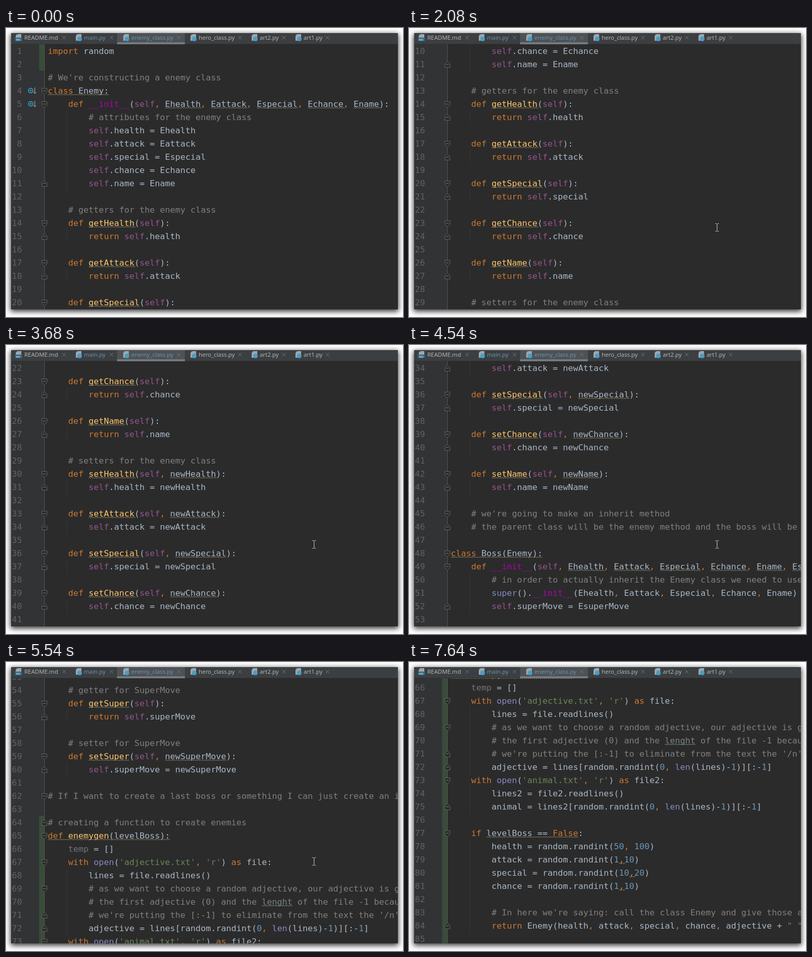
Recreate the animation shown at these times as an HTML page. Size 779 px wide and 568 px high, loop 8 s.

```html
<!DOCTYPE html>
<html lang="en">
<head>
<meta charset="utf-8">
<title>Scrolling code editor</title>
<style>
  html, body { margin: 0; width: 100%; height: 100%; overflow: hidden; background: #fff; }
  #window { position: absolute; left: 10px; top: 10px; width: 759px; height: 543px;
    background: #2b2b2b; box-shadow: 0 3px 10px 1px rgba(0, 0, 0, .8); }
  svg { position: absolute; left: 0; top: 0; }
  .code text { font: 16.61px "DejaVu Sans Mono", monospace; white-space: pre; }
  .tabs text { font: 11.4px "Open Sans", "Noto Sans", sans-serif; }
  .tabs .badge { font: bold 6px "Liberation Sans", sans-serif; }
</style>
</head>
<body>
<div id="window"></div>
<svg width="779" height="568" viewBox="0 0 779 568">
  <clipPath id="pane"><rect x="10" y="32" width="759" height="521"/></clipPath>
  <g clip-path="url(#pane)">
    <rect x="10" y="32" width="66" height="521" fill="#313335"/>
    <rect x="75" y="32" width="1" height="521" fill="#555"/>
    <g id="page" class="code"></g>
    <path id="cursor" fill="none" stroke="#d0d0d0" d="M-3.5-7.5h2.5l1 1 1-1h2.5M0-6.5v13M-3.5 7.5h2.5l1-1 1 1h2.5"/>
  </g>
  <g id="tabs" class="tabs"></g>
</svg>
<script>
const LOOP = 8000, ROW = 26, COL = 10, LEFT = 82;

const getter = (name, field) => `    def get${name}(self):\n        return self.${field}\n`;
const setter = (name, field) =>
  `    def set${name}(self, new${name}):\n        self.${field} = new${name}\n`;
const fields = ['Health', 'Attack', 'Special', 'Chance', 'Name'];
const each = make => fields.map(f => make(f, f.toLowerCase())).join('\n');

const source = `import random

# We're constructing a enemy class
class Enemy:
    def __init__(self, Ehealth, Eattack, Especial, Echance, Ename):
        # attributes for the enemy class
${fields.map(f => `        self.${f.toLowerCase()} = E${f.toLowerCase()}`).join('\n')}

    # getters for the enemy class
${each(getter)}
    # setters for the enemy class
${each(setter)}
    # we're going to make an inherit method
    # the parent class will be the enemy method and the boss will be the child

class Boss(Enemy):
    def __init__(self, Ehealth, Eattack, Especial, Echance, Ename, EsuperMove):
        # in order to actually inherit the Enemy class we need to use super
        super().__init__(Ehealth, Eattack, Especial, Echance, Ename)
        self.superMove = EsuperMove

    # getter for SuperMove
${getter('Super', 'superMove')}
    # setter for SuperMove
    def setSuper(self, newSuperMove):
        self.superMove = newSuperMove

# If I want to create a last boss or something I can just create an instance

# creating a function to create enemies
def enemygen(levelBoss):
    temp = []
    with open('adjective.txt', 'r') as file:
        lines = file.readlines()
        # as we want to choose a random adjective, our adjective is going
        # the first adjective (0) and the lenght of the file -1 because
        # we're putting the [:-1] to eliminate from the text the '/n'
        adjective = lines[random.randint(0, len(lines)-1)][:-1]
    with open('animal.txt', 'r') as file2:
        lines2 = file2.readlines()
        animal = lines2[random.randint(0, len(lines)-1)][:-1]

    if levelBoss == False:
        health = random.randint(50, 100)
        attack = random.randint(1,10)
        special = random.randint(10,20)
        chance = random.randint(1,10)

        # In here we're saying: call the class Enemy and give those attributes
        return Enemy(health, attack, special, chance, adjective + " " + animal)
`;
const lines = source.split('\n');

const colors = {
  comment: '#808080', string: '#6a8759', keyword: '#cc7832', self: '#94558d',
  magic: '#b200b2', name: '#ffc66d', builtin: '#8888c6', number: '#6897bb', unused: '#72737a'
};
const token = new RegExp([
  '(?<comment>#.*)', `(?<string>'[^']*'|"[^"]*")`,
  '(?<keyword>\\b(?:import|class|def|return|with|as|if|False)\\b|,)',
  '(?<self>\\bself\\b)', '(?<magic>__\\w+__)', '(?<name>(?<=def )[a-z]\\w*)',
  '(?<builtin>\\b(?:super|open|len)(?=\\())', '(?<number>\\b\\d+\\b)', '(?<unused>\\btemp\\b)'
].join('|'), 'g');

const foldStarts = [4, 5, 14, 17, 20, 23, 26, 30, 33, 36, 39, 42, 45, 48, 49, 55, 59, 62, 65, 67, 69, 73, 77];
const foldEnds = [11, 15, 18, 21, 24, 27, 31, 34, 37, 40, 43, 46, 52, 56, 60, 64, 71, 72, 75, 84];

const rect = (x, y, w, h, fill) => `<rect x="${x}" y="${y}" width="${w}" height="${h}" fill="${fill}"/>`;
const label = (x, y, s, fill) => `<text x="${x}" y="${y}" fill="${fill}">${s}</text>`;
const stroke = (d, color, fill = 'none') => `<path d="${d}" stroke="${color}" fill="${fill}"/>`;

function codeLine(line, y) {
  let out = '', at = 0;
  const put = (s, col, fill) => {
    const pad = s.search(/\S/);
    if (pad >= 0) out += label(LEFT + (col + pad) * COL, y, s.trim(), fill);
  };
  for (const m of line.matchAll(token)) {
    put(line.slice(at, m.index), at, '#a9b7c6');
    const kind = Object.keys(m.groups).find(k => m.groups[k]);
    put(m[0], m.index, colors[kind]);
    at = m.index + m[0].length;
  }
  put(line.slice(at), at, '#a9b7c6');
  return out;
}

function waves(line, y) {
  const rules = [
    /^(class|def).*/g, /(?<=^    def )[a-z]\w*/g, /(?<=^    def .*, )\w+/g,
    /levelBoss == False/g, /(?<=\d),(?=\d)/g, /lenght/g
  ];
  return rules.flatMap(rule => [...line.matchAll(rule)]).map(m => {
    const zigzag = 'l2-2l2 2'.repeat(Math.round(m[0].length * 2.5));
    return stroke(`M${LEFT + m.index * COL} ${y + 3}${zigzag}`, m[0] === 'lenght' ? '#659c6b' : '#857b60');
  }).join('');
}

function fold(y, end) {
  const s = end ? -1 : 1;
  return stroke(`M70.5 ${y - 5.5 * s}h10v${7 * s}l-5 ${5 * s}l-5 ${-5 * s}z`, '#606366', '#2b2b2b') +
    stroke(`M73 ${y - .5}h5`, '#808080');
}

function overriddenIcon(y) {
  return `<circle cx="48.5" cy="${y}" r="4.4" fill="#263840" stroke="#3e91b5" stroke-width="2"/>` +
    `<circle cx="48.5" cy="${y}" r="1.8" fill="#3e91b5"/>` +
    stroke(`M56.5 ${y - 6}v12m-3-3l3 3 3-3`, '#afb1b3');
}

function buildPage() {
  let out = rect(65, 32, 10, 2 * ROW, '#384c38') + rect(65, 32 + 63 * ROW, 10, 23 * ROW, '#384c38');
  lines.forEach((line, i) => {
    const n = i + 1, mid = 45 + i * ROW, base = mid + 6;
    if (line.startsWith('        ') || n === 82) out += rect(119, mid - 13, 1, ROW, '#393939');
    out += label(n < 10 ? 21.5 : 11.5, base, n, '#606366');
    out += codeLine(line, base) + waves(line, base);
    if (foldStarts.includes(n)) out += fold(mid + 1, false);
    if (foldEnds.includes(n)) out += fold(mid + 1, true);
    if (n === 4 || n === 5) out += overriddenIcon(mid);
  });
  return out;
}

function buildTabs() {
  const file = x => `<path d="M${x + 4} 12h7v13h-11v-9z" fill="#9aa7b0"/>` +
    `<path d="M${x + 3} 12v3h-3z" fill="#9aa7b0"/>`;
  const tab = (x, name, close, fill = '#bbb') =>
    label(x, 23, name, fill) + stroke(`M${close - 3.5} 15.5l7 7m0-7l-7 7`, '#717475');
  const pyTab = (x, name, close, fill) => file(x - 16) +
    `<circle cx="${x - 8.5}" cy="21.5" r="4.5" fill="#4a9cc5"/>` + tab(x, name, close, fill);
  return rect(10, 10, 759, 22, '#3c3f41') + rect(10, 31, 759, 1, '#323232') +
    rect(218, 10, 133, 21, '#4e5254') + rect(218, 28, 133, 4, '#747a80') +
    '<rect id="hover" x="556" y="10" width="87" height="21" fill="#2e3133"/>' +
    file(19) + rect(17, 19, 15, 7, '#2c5f7c') +
    '<text class="badge" x="19.5" y="25" fill="#a9d4ea">MD</text>' +
    tab(36, 'README.md', 114) + pyTab(153, 'main.py', 207, '#6897bb') +
    pyTab(246, 'enemy_class.py', 339, '#6897bb') + pyTab(378, 'hero_class.py', 459) +
    pyTab(498, 'art2.py', 545) + pyTab(584, 'art1.py', 631);
}

// Each move: first step time, last step time, step count, destination.
const scrolls = [
  [940, 1470, 8, 156], [1940, 2080, 3, 234], [2770, 2920, 3, 312],
  [3230, 3680, 7, 546], [3760, 3990, 4, 702], [4070, 4540, 7, 858],
  [4690, 5080, 6, 1180], [5150, 5230, 2, 1248], [5380, 5920, 8, 1568], [5990, 6070, 2, 1685]
];
const pointer = [
  [150, 450, 5, 598, 384], [620, 620, 1, 597, 384], [940, 1090, 3, 604, 392],
  [6700, 6930, 4, 606, 486], [7010, 7470, 7, 604, 10]
];

function follow(moves, start, t) {
  let pos = start;
  for (const [t0, t1, n, ...to] of moves) {
    if (t < t0) break;
    const step = n > 1 ? Math.floor((t - t0) / (t1 - t0) * (n - 1) + 1e-6) : 0;
    const part = Math.min(1, (step + 1) / n);
    pos = pos.map((p, i) => p + (to[i] - p) * part);
  }
  return pos.map(Math.round);
}

const $ = id => document.getElementById(id);
$('page').innerHTML = buildPage();
$('tabs').innerHTML = buildTabs();

function draw(t) {
  const [top] = follow(scrolls, [0], t);
  const [x, y] = follow(pointer, [755, 585], t);
  $('page').setAttribute('transform', `translate(0 ${-top})`);
  $('cursor').setAttribute('transform', `translate(${x + .5} ${y})`);
  $('hover').setAttribute('opacity', t < 7470 || t >= 7640 ? 0 : t < 7550 ? 1 : .5);
}

const begin = performance.now();
function tick() {
  draw((performance.now() - begin) % LOOP);
  requestAnimationFrame(tick);
}
tick();
</script>
</body>
</html>
```
